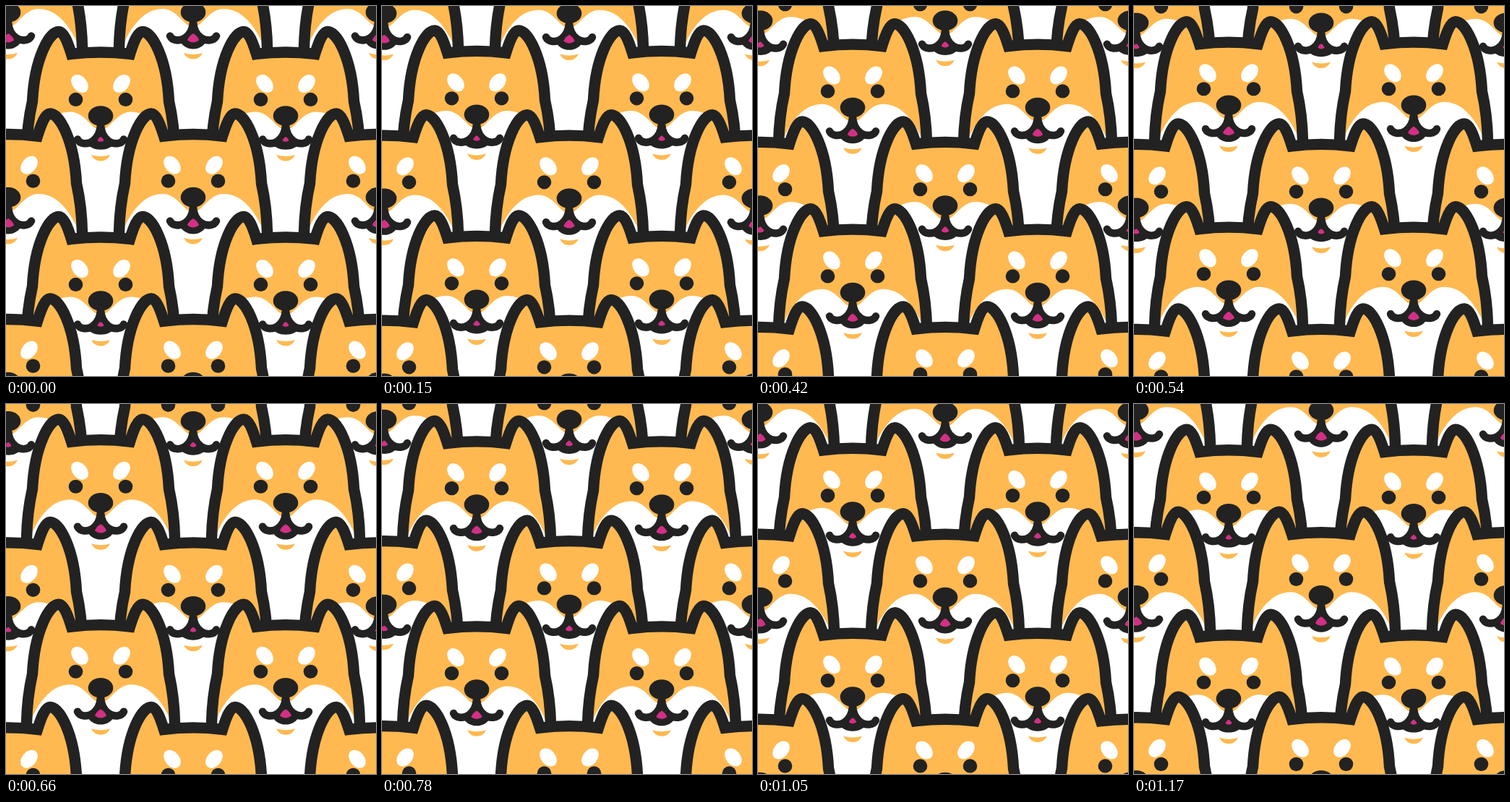
Write an HTML page with a canvas that moves like this. It is 512x512 px and loops after 1.2 s.

```html
<!DOCTYPE html>
<html lang="en">
<head>
<meta charset="utf-8">
<title>Dog pattern</title>
<style>
  html, body { margin: 0; width: 100%; height: 100%; overflow: hidden; background: #fff; }
  canvas { display: block; width: 512px; height: 512px; }
</style>
</head>
<body>
<canvas id="stage" width="512" height="512"></canvas>
<script>
const ctx = document.getElementById('stage').getContext('2d');
const INK = '#222', FUR = '#ffb950', WHITE = '#fff', PINK = '#d23085';
const LOOP = 1200, STEP = 30, LAG = 20, ROW = 128;

const outline = new Path2D(`M-108 420 L-102.5 200 C-102 175 -99 152 -94.5 132
  C-91.5 72 -71 35.5 -58 35.5 C-51 36 -46 49 -40.5 66.5 Q0 61.5 40.5 66.5
  C46 49 51 36 58 35.5 C71 35.5 91.5 72 94.5 132 C99 152 102 175 102.5 200 L108 420 Z`);
const muzzle = new Path2D(`M0 172 C14 170 22 146.5 42 146.5 C64 146.5 80 163 93 188 L100 205
  L106 433 L-106 433 L-100 205 L-93 188 C-80 163 -64 146.5 -42 146.5 C-22 146.5 -14 170 0 172 Z`);
const smile = new Path2D(`M-32 184.5 C-29 191.5 -18 192 -11 187 Q-1 180 0 165
  Q1 180 11 187 C18 192 29 191.5 32 184.5`);
const tongue = new Path2D('M0 0 C4 2 8 7 8 9.5 Q0 15.5 -8 9.5 C-8 7 -4 2 0 0 Z');
const chin = new Path2D('M-13 206 Q0 210 13 206 Q9 214.5 0 214.5 Q-9 214.5 -13 206 Z');

function oval(x, y, rx, ry, turn, color) {
  ctx.beginPath();
  ctx.ellipse(x, y, rx, ry, turn, 0, 2 * Math.PI);
  ctx.fillStyle = color;
  ctx.fill();
}

function fill(path, color) {
  ctx.fillStyle = color;
  ctx.fill(path);
}

function line(path, width, join) {
  ctx.strokeStyle = INK;
  ctx.lineWidth = width;
  ctx.lineJoin = join;
  ctx.stroke(path);
}

function lifted(dy, draw) {
  ctx.save();
  ctx.translate(0, -dy);
  draw();
  ctx.restore();
}

// up: 0 = head lowered, 1 = head raised with the mouth open
function dog(x, y, up) {
  ctx.save();
  ctx.translate(x, y);
  lifted(14.5 * up, () => {
    fill(outline, FUR);
    fill(muzzle, WHITE);
    line(outline, 15.4, 'miter');
  });
  lifted(13 * up, () => fill(chin, FUR));
  lifted(15 * up, () => {
    const lip = 202 + 5 * up;
    fill(new Path2D(`M-19 189 L0 180 L19 189 C14 ${lip} -14 ${lip} -19 189 Z`), INK);
    line(smile, 10.5, 'round');
    ctx.translate(0, 181);
    ctx.scale(0.55 + 0.45 * up, 0.55 + 0.45 * up);
    fill(tongue, PINK);
  });
  lifted(15.4 * up, () => {
    oval(0, 152, 17.3, 13.8, 0, INK);
    for (const side of [-1, 1]) {
      oval(side * 34.5, 129.5, 9.8, 9.6, 0, INK);
      oval(side * 29, 107.5, 10, 14, side * 0.7, WHITE);
    }
  });
  ctx.restore();
}

function draw(ms) {
  const t = Math.floor((ms % LOOP) / STEP) * STEP;
  const up = (1 - Math.cos(2 * Math.PI * (t - LAG) / LOOP)) / 2;
  ctx.fillStyle = WHITE;
  ctx.fillRect(0, 0, 512, 512);
  ctx.lineCap = 'round';
  for (let row = -2; row <= 3; row++) {
    const odd = row & 1;
    for (let x = odd ? 3 : 131; x < 600; x += 2 * ROW) {
      dog(x, row * ROW, odd ? 1 - up : up);
    }
  }
}

const start = performance.now();
function tick() {
  draw(performance.now() - start);
  requestAnimationFrame(tick);
}
tick();
</script>
</body>
</html>
```
